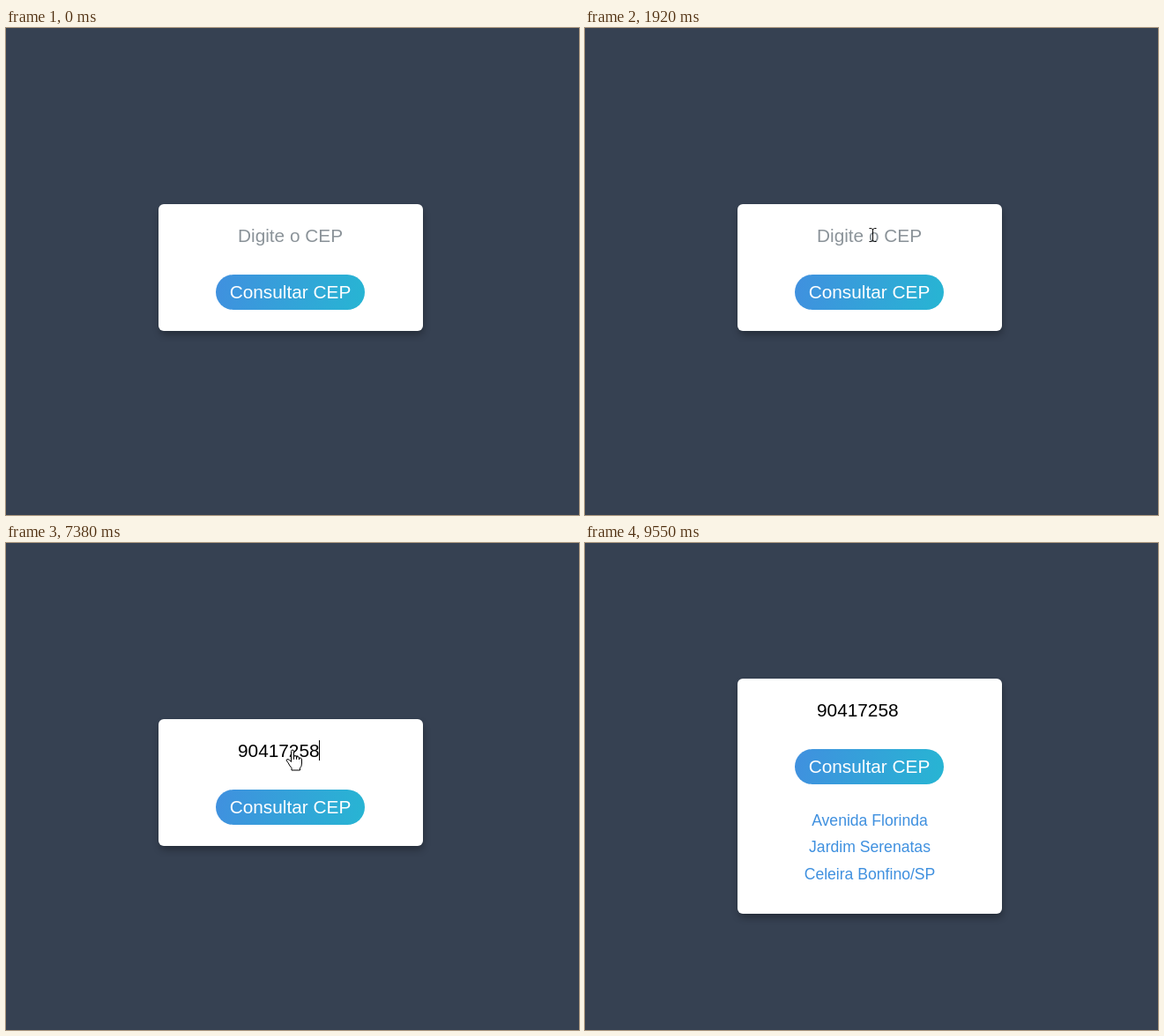
An HTML page for the animation above (9.68 s loop, 650 px wide and 553 px high).

```html
<!DOCTYPE html>
<html lang="pt-BR">
<head>
<meta charset="utf-8">
<title>Consultar CEP</title>
<style>
html, body { margin: 0; width: 100%; height: 100%; overflow: hidden; background: #364152; }
body { position: relative; font: 20.8px/24px "Liberation Sans", Arial, sans-serif; }
div, svg { position: absolute; }
#card { left: 173px; width: 300px; background: #fff; border-radius: 6px; box-shadow: 1px 5px 8px -1px rgba(0, 0, 0, .32); }
#field { left: 90px; top: 24px; white-space: pre; }
#caret { top: 24px; width: 1px; height: 23px; background: #000; }
#button { left: 65px; top: 80px; width: 169px; height: 40px; line-height: 40px; text-align: center;
  color: #fff; border-radius: 20px; background: linear-gradient(100deg, #4090df, #27b5d3); }
#result { top: 145.5px; width: 100%; text-align: center; font-size: 17.6px; line-height: 30.5px; color: #3f90df; }
#pointer { left: 0; top: 0; width: 650px; height: 553px; }
</style>
</head>
<body>
<div id="card">
  <div id="field"></div>
  <div id="caret"></div>
  <div id="button">Consultar CEP</div>
  <div id="result">Avenida Florinda<br>Jardim Serenatas<br>Celeira Bonfino/SP</div>
</div>
<svg id="pointer"><path id="shape" stroke="#000" stroke-linejoin="round"/></svg>
<script>
const LOOP = 9680, CODE = "90417258", DIGIT = 11.57, BLINK = 510;
const focusTime = 1960, submitTime = 7380, resultTime = 7400;

// Typing speeds up slightly from key to key
const keyTimes = [...CODE].map((_, n) => 4360 + 445 * n - 10 * n * n);

// Pointer strokes along Bezier curves; the pointer rests where a stroke ends
const strokes = [
  { from: 170, to: 440, ease: 1, curve: [[496, 547], [140, 525], [-14, 420]] },
  { from: 960, to: 1350, ease: 3, curve: [[5, 4], [350, 109], [326, 250]] },
  { from: 1650, to: 1830, ease: 2, curve: [[326, 250], [326, 235]] },
  { from: 8470, to: 9240, ease: 1, curve: [[350, 251], [580, 345], [510, 400], [620, 560]] }
];

const shapes = {
  arrow: { d: "M.5.5V16.5L4.2 13L6.6 18.5L9 17.5L6.7 12.2H11.7Z", fill: "#fff" },
  beam: { d: "M-3.5-7.5H-1.5L.5-6.5L2.5-7.5H4.5M.5-6.5V6.5M-3.5 7.5H-1.5L.5 6.5L2.5 7.5H4.5", fill: "none" },
  hand: { d: "M-2.5 1.5a1.5 1.5 0 0 1 3 0V10.5V7q3-1.2 3 1V10.5V8q3-1.2 3 1V11V9q3-.6 3 2V15" +
             "q0 4-2 5.5V23H-2V20.5q-2-2-4-6q-3-3.5-1-4q2-.5 4.5 3Z", fill: "#fff" }
};

const $ = id => document.getElementById(id);
const show = (id, on) => $(id).style.display = on ? "block" : "none";

function bezier(points, u) {
  if (points.length === 1) return points[0];
  const [x, y] = bezier(points.slice(0, -1), u), [x2, y2] = bezier(points.slice(1), u);
  return [x + (x2 - x) * u, y + (y2 - y) * u];
}

function pointerKind(t, x, y) {
  if (t >= submitTime && x < 407 && y < 274) return "hand";
  return t < submitTime && x > 263 && x < 383 && y >= 224 && y < 248 ? "beam" : "arrow";
}

function drawPointer(t) {
  const stroke = strokes.filter(s => s.from <= t).pop();
  show("pointer", stroke);
  if (!stroke) return;
  const { from, to, ease, curve } = stroke;
  const u = 1 - (1 - Math.min(1, (t - from) / (to - from))) ** ease;
  const [x, y] = bezier(curve, u).map(Math.round);
  const { d, fill } = shapes[pointerKind(t, x, y)];
  const attrs = { d, fill, transform: `translate(${x} ${y})` };
  for (const name in attrs) $("shape").setAttribute(name, attrs[name]);
}

function draw(t) {
  const typed = keyTimes.filter(k => k <= t).length, done = t >= resultTime;
  const idle = t - (typed ? keyTimes[typed - 1] : focusTime);
  $("card").style.top = (done ? 154 : 200) + "px";
  $("card").style.height = (done ? 267 : 144) + "px";
  show("result", done);
  $("field").textContent = typed ? CODE.slice(0, typed) : "Digite o CEP";
  $("field").style.color = typed ? "#000" : "#8b9399";
  $("caret").style.left = 90 + Math.floor(typed * DIGIT) + "px";
  show("caret", idle >= 0 && Math.floor(idle / BLINK) % 2 === 0);
  drawPointer(t);
}

const start = performance.now();
function frame() {
  draw((performance.now() - start) % LOOP);
  requestAnimationFrame(frame);
}
frame();
</script>
</body>
</html>
```
